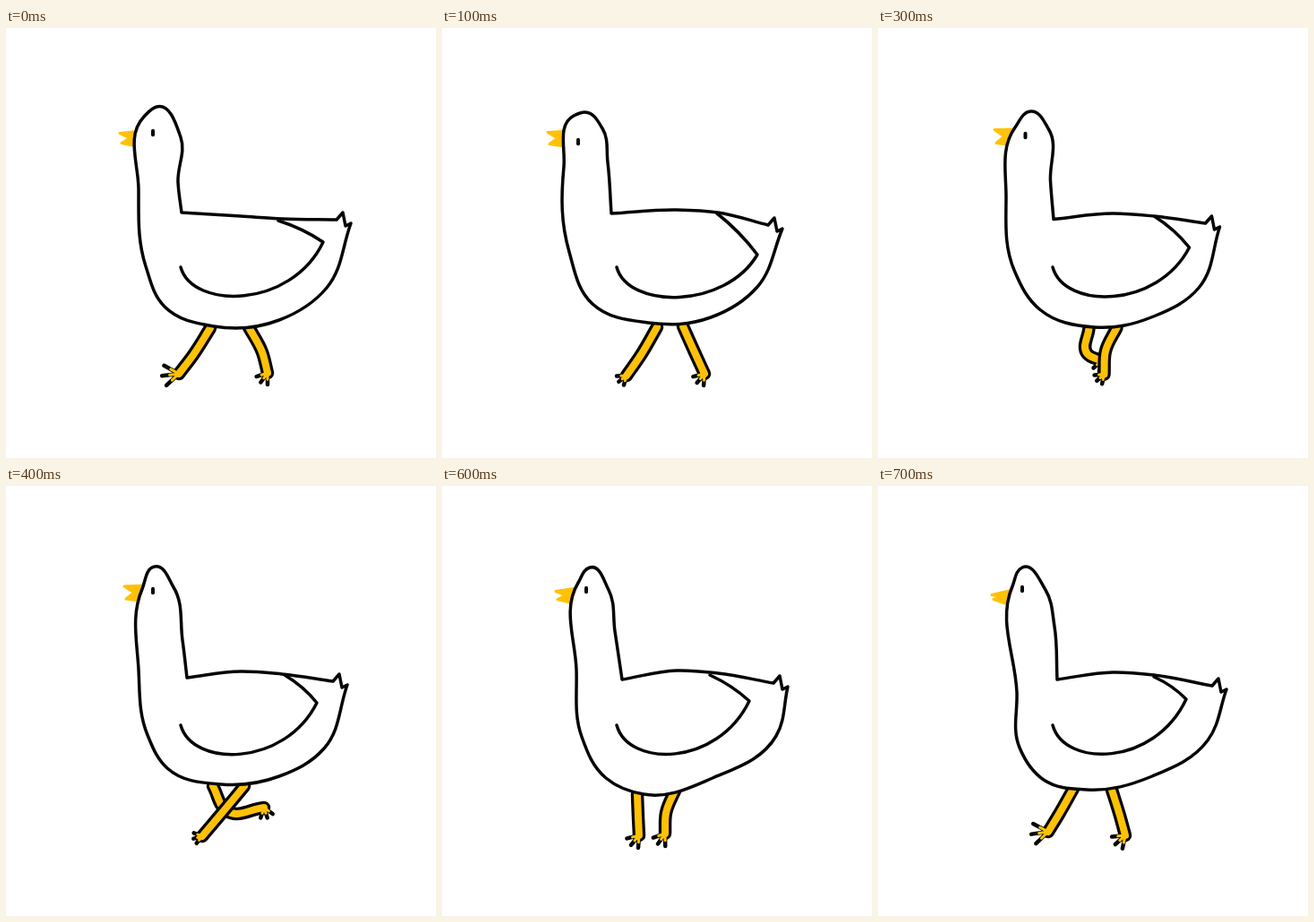
Write an HTML page with a canvas that moves like this. It is 480 px wide and 480 px high and loops after 0.8 s.

```html
<!DOCTYPE html>
<html lang="en">
<head>
<meta charset="utf-8">
<title>Walking goose</title>
<style>
  html, body { margin: 0; height: 100%; overflow: hidden; background: #fff; }
  canvas { display: block; }
</style>
</head>
<body>
<canvas id="stage" width="480" height="480"></canvas>
<script>
const ctx = document.getElementById('stage').getContext('2d');
const INK = '#050505', YELLOW = '#ffc107', STEP = 100, LINE = 3.5;

// body: neck corner, nape, temple, crown, brow, throat, chest, breast, keel, belly, rump, tail tip
// back: height of the back; wing: its start and tip; beak: x, y, opening
// legs: hip, knee, ankle, [foot angle in degrees, toe length]
const poses = [];
poses[0] = {
  body: [[196, 206], [192, 172], [195, 122], [168, 88], [154, 99], [148, 180], [156, 266], [177, 311], [232, 333], [305, 326], [358, 290], [385, 218]],
  back: 210, wing: [[304, 215], [354, 239]], eye: [164, 117], beak: [127, 123, 11],
  legs: [[[228, 335], [209, 365], [193, 386], [173, 19]], [[271, 334], [286, 362], [292, 385], [126, 13]]]
};
poses[1] = {
  body: [[189, 207], [185, 150], [179, 112], [160, 94], [147, 98], [136, 155], [142, 250], [168, 308], [230, 329], [300, 323], [352, 289], [380, 224]],
  back: 203, wing: [[307, 207], [352, 253]], eye: [152, 127], beak: [118, 123, 13],
  legs: [[[240, 334], [222, 365], [206, 388], [142, 11]], [[269, 333], [282, 362], [293, 386], [130, 13]]]
};
poses[2] = {
  body: [[190, 213], [188, 170], [194, 113], [175, 96], [154, 107], [138, 175], [147, 265], [182, 314], [243, 335], [310, 320], [362, 286], [382, 222]],
  back: 207, wing: [[307, 210], [348, 248]], eye: [165, 123], beak: [128, 123, 16],
  legs: [[[240, 335], [220, 364], [211, 384], [133, 12]], [[267, 334], [267, 356], [286, 382], [112, 12]]]
};
poses[4] = {
  body: [[202, 214], [197, 172], [187, 113], [166, 90], [152, 115], [148, 205], [158, 278], [180, 315], [240, 333], [305, 324], [355, 293], [381, 222]],
  back: 207, wing: [[311, 211], [347, 242]], eye: [164, 117], beak: [132, 119, 14],
  legs: [[[231, 335], [247, 363], [288, 359], [72, 12]], [[266, 335], [241, 365], [219, 391], [165, 10]]]
};
poses[6] = {
  body: [[201, 216], [193, 162], [186, 116], [165, 91], [152, 108], [150, 205], [156, 280], [183, 326], [225, 344], [302, 326], [373, 279], [386, 224]],
  back: 206, wing: [[299, 211], [343, 240]], eye: [161, 116], beak: [127, 122, 9],
  legs: [[[218, 344], [219, 370], [220, 390], [130, 14]], [[261, 338], [250, 365], [249, 388], [125, 14]]]
};
poses[7] = {
  body: [[200, 216], [197, 157], [187, 116], [161, 91], [150, 112], [155, 230], [158, 292], [185, 328], [233, 339], [306, 324], [368, 284], [389, 227]],
  back: 208, wing: [[308, 213], [344, 238]], eye: [161, 115], beak: [127, 124, 5],
  legs: [[[218, 338], [201, 368], [190, 386], [172, 19]], [[260, 336], [270, 368], [276, 390], [138, 15]]]
};

// Halfway between two values of the same structure.
function between(a, b) {
  if (typeof a === 'number') return (a + b) / 2;
  if (Array.isArray(a)) return a.map((v, i) => between(v, b[i]));
  return Object.fromEntries(Object.keys(a).map(k => [k, between(a[k], b[k])]));
}
poses[3] = between(poses[2], poses[4]);
poses[5] = between(poses[4], poses[6]);

// Unit direction of the curve at point i; the nearer neighbour counts more.
function direction(pts, i) {
  let x = 0, y = 0;
  for (const [a, b] of [[pts[i - 1], pts[i]], [pts[i], pts[i + 1]]]) {
    if (!a || !b) continue;
    const dx = b[0] - a[0], dy = b[1] - a[1], d2 = dx * dx + dy * dy;
    x += dx / d2;
    y += dy / d2;
  }
  const d = Math.hypot(x, y);
  return [x / d, y / d];
}

// Smooth curve through the points, continuing from pts[0].
function curve(path, pts) {
  for (let i = 1; i < pts.length; i++) {
    const [x0, y0] = pts[i - 1], [x1, y1] = pts[i];
    const [ax, ay] = direction(pts, i - 1), [bx, by] = direction(pts, i);
    const h = Math.hypot(x1 - x0, y1 - y0) * 0.36;
    path.bezierCurveTo(x0 + ax * h, y0 + ay * h, x1 - bx * h, y1 - by * h, x1, y1);
  }
}

function stroke(path, width, color) {
  ctx.lineWidth = width;
  ctx.strokeStyle = color;
  ctx.stroke(path);
}

function fill(path, color) {
  ctx.fillStyle = color;
  ctx.fill(path);
}

function drawBeak([x, y, open]) {
  const path = new Path2D();
  path.moveTo(x, y - open / 2);
  path.lineTo(x + 24, y - 8);
  path.lineTo(x + 24, y + 10);
  path.lineTo(x + 2, y + open / 2);
  path.lineTo(x + 11, y);
  path.closePath();
  fill(path, YELLOW);
  stroke(path, 3, YELLOW);
}

function drawLeg([hip, knee, ankle, [angle, length]]) {
  const shin = new Path2D();
  shin.moveTo(...hip);
  curve(shin, [hip, knee, ankle]);
  const toes = reach => {
    const path = new Path2D();
    for (const spread of [-36, 0, 36]) {
      const a = (angle + spread) * Math.PI / 180;
      path.moveTo(...ankle);
      path.lineTo(ankle[0] + reach * Math.cos(a), ankle[1] + reach * Math.sin(a));
    }
    return path;
  };
  stroke(shin, 14.5, INK);
  stroke(toes(length), 4.5, INK);
  stroke(shin, 8, YELLOW);
  stroke(toes(length * 0.55), 3, YELLOW);
}

function drawBody({ body, back }) {
  const [x, y] = body[body.length - 1];
  const base = [x - 16, y - 4];
  const path = new Path2D();
  path.moveTo(...body[0]);
  curve(path, body);
  path.lineTo(x - 6, y + 3);
  path.lineTo(x - 9, y - 12);
  path.lineTo(...base);
  curve(path, [base, [308, back + 3], [262, back], body[0]]);
  path.closePath();
  fill(path, '#fff');
  stroke(path, LINE, INK);
}

function drawWing([[x0, y0], [x1, y1]]) {
  const path = new Path2D();
  path.moveTo(x0, y0);
  path.quadraticCurveTo((x0 + x1) / 2 + 3, (y0 + y1) / 2 - 3, x1, y1);
  path.bezierCurveTo(x1 - 36, 314, 208, 314, 195, 267);
  stroke(path, LINE, INK);
}

function drawEye([x, y]) {
  const path = new Path2D();
  path.moveTo(x, y - 2.3);
  path.lineTo(x, y + 2.3);
  stroke(path, 4, INK);
}

function draw(time) {
  const pose = poses[Math.floor(time / STEP) % poses.length];
  ctx.fillStyle = '#fff';
  ctx.fillRect(0, 0, 480, 480);
  ctx.lineCap = ctx.lineJoin = 'round';
  drawBeak(pose.beak);
  pose.legs.forEach(drawLeg);
  drawBody(pose);
  drawWing(pose.wing);
  drawEye(pose.eye);
}

const start = performance.now();
function tick() {
  draw(performance.now() - start);
  requestAnimationFrame(tick);
}
tick();
</script>
</body>
</html>
```
